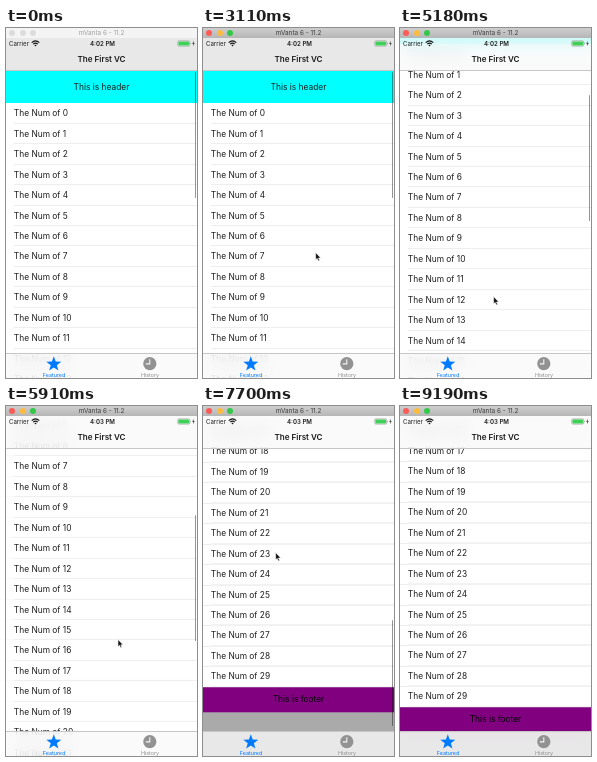
An HTML page for the animation above (9940 ms loop, 191 by 350 pixels).

```html
<!DOCTYPE html>
<html lang="en">
<head>
<meta charset="utf-8">
<title>Table with header and footer</title>
<style>
html, body { margin: 0; width: 100%; height: 100%; overflow: hidden; background: #fff; }
body { font: 8.4px Inter, Roboto, "Liberation Sans", sans-serif; color: #1c1c1c; }
#stage { position: relative; width: 191px; height: 350px; overflow: hidden; }
#stage div, #stage svg { position: absolute; }
.mid { left: 0; width: 191px; text-align: center; white-space: nowrap; }

#view { left: 0; top: 10px; width: 191px; height: 340px; background: #aaa; overflow: hidden; }
#list { left: 0; top: 32.6px; width: 191px; }
.row { left: 0; width: 191px; height: 20.45px; line-height: 20.45px; background: #fff; }
.row span { position: absolute; left: 7.8px; right: 0; height: 100%; box-sizing: border-box; border-bottom: 1px solid #eee; white-space: nowrap; }
.head { height: 32.7px; line-height: 32.7px; background: #0ff; }
.foot { height: 25.2px; line-height: 25.2px; background: #800080; color: #000; }

.glass { left: 0; width: 191px; box-sizing: border-box; background: rgba(249, 249, 249, .79); backdrop-filter: blur(7px); }
#nav { top: 10px; height: 33px; border-bottom: 1px solid #c6c6c6; }
#tabs { top: 325px; height: 25px; border-top: 1px solid #c6c6c6; }
#tabs div { top: 17.5px; width: 60px; font-size: 5.4px; line-height: 7px; text-align: center; }
.status { top: 2px; font-size: 6.1px; line-height: 7px; }
.title { top: 15px; font-size: 8.1px; line-height: 12px; font-weight: 600; }

#bar { left: 0; top: 0; width: 191px; height: 10px; background: #f4f4f4; color: #a0a0a0; font-size: 6.4px; line-height: 10px; }
#bar.on { background: linear-gradient(#cecece, #b6b6b6); color: #3c3c3c; }
#bar i { position: absolute; top: 2px; width: 6px; height: 6px; border-radius: 50%; background: #dcdcdc; }
#bar.on i:nth-of-type(1) { background: #fc5b57; }
#bar.on i:nth-of-type(2) { background: #fdbc40; }
#bar.on i:nth-of-type(3) { background: #34c84a; }

#thumb { left: 188.5px; width: 1.5px; border-radius: 1px; background: rgba(0, 0, 0, .42); }
#mouse { left: 0; top: 0; }
</style>
</head>
<body>
<div id="stage">
  <div id="view"><div id="list"></div></div>
  <div id="thumb"></div>
  <div id="nav" class="glass">
    <div class="status" style="left:3px">Carrier</div>
    <svg style="left:25px;top:2px" width="9" height="7" viewBox="0 0 9 7" fill="none" stroke="#111" stroke-width="1.1">
      <path d="M.7 2.6Q4.5 -.9 8.3 2.6M2.2 4.1Q4.5 2.1 6.8 4.1"/>
      <path d="M3.3 5.1Q4.5 4.2 5.7 5.1L4.5 6.4Z" fill="#111" stroke="none"/>
    </svg>
    <div class="status mid" id="clock" style="left:1px;font-weight:600"></div>
    <svg style="left:171px;top:2px" width="19" height="7" viewBox="0 0 19 7">
      <rect x=".7" y=".9" width="12" height="5.2" rx="1.2" fill="#fff" stroke="#777" stroke-width=".5"/>
      <rect x="1.4" y="1.6" width="10.6" height="3.8" rx=".6" fill="#3fd058"/>
      <path d="M13.3 2.5Q14.3 3.5 13.3 4.5Z" fill="#555"/>
      <path d="M16.8 .8L15.2 3.8H16.4L15.9 6.2L17.7 3H16.5Z" fill="#333"/>
    </svg>
    <div class="title mid">The First VC</div>
  </div>
  <div id="tabs" class="glass">
    <svg style="left:0;top:0" width="191" height="20">
      <path id="star" fill="#007aff"/>
      <circle cx="143.8" cy="9.7" r="6.6" fill="#929292"/>
      <path d="M143.8 5.2V9.9H139.8" fill="none" stroke="#f4f4f4" stroke-width="1.1"/>
    </svg>
    <div style="left:18px;color:#007aff">Featured</div>
    <div style="left:114px;color:#8e8e8e">History</div>
  </div>
  <div id="bar">
    <i style="left:3px"></i><i style="left:13.5px"></i><i style="left:24px"></i>
    <div class="mid">mVanta 6 - 11.2</div>
  </div>
  <svg id="mouse" width="8" height="11" viewBox="0 0 8 11">
    <path d="M.6 .6V7.8L2.2 6.4L3.3 9L4.6 8.4L3.5 6H5.8Z" fill="#111" stroke="#fff" stroke-width=".6"/>
  </svg>
</div>
<script>
const $ = id => document.getElementById(id);
const LOOP = 9940, WAKE = 1040, TICK = 147.8;
const ROW = 20.45, HEAD = 32.7, ROWS = 30, MAX = 387.7;

// each gesture eases the scroll offset and the pointer to a new place
const gestures = [
  { from: 0, to: 0, y: 0, mouse: [-20, 140] },
  { from: 900, to: 1340, y: 0, mouse: [92, 154] },
  { from: 1340, to: 2070, y: -40.5, mouse: [95, 235] },      // pull down
  { from: 2220, to: 3100, y: 0, mouse: [112, 224] },         // spring back
  { from: 3110, to: 3250, y: 0, mouse: [98, 226] },
  { from: 3990, to: 4290, y: 0, mouse: [96, 318] },
  { from: 4290, to: 5170, y: 59, mouse: [93, 268] },         // drag up
  { from: 5180, to: 5470, y: 68, mouse: [93, 259] },
  { from: 5620, to: 6500, y: MAX + 2, mouse: [152, 175] },   // flick to the end
  { from: 6510, to: 6650, y: MAX, mouse: [152, 175] },
  { from: 6660, to: 7400, y: MAX, mouse: [73, 178] },
  { from: 7400, to: 7690, y: MAX + 20, mouse: [72, 146] },   // pull past the footer
  { from: 8140, to: 8860, y: MAX, mouse: [150, 210] },       // spring back
  { from: 8860, to: 9160, y: MAX, mouse: [200, 250] }
];

function add(cls, top, html) {
  const el = document.createElement("div");
  el.className = cls;
  el.style.top = top + "px";
  el.innerHTML = html;
  $("list").append(el);
}
add("head mid", 0, "This is header");
for (let i = 0; i < ROWS; i++) add("row", HEAD + i * ROW, `<span>The Num of ${i}</span>`);
add("foot mid", HEAD + ROWS * ROW, "This is footer");

$("star").setAttribute("d", "M" + Array.from({ length: 10 }, (_, i) => {
  const r = i % 2 ? 3.2 : 7.9, a = i * Math.PI / 5;
  return (47.8 + r * Math.sin(a)).toFixed(2) + " " + (10.2 - r * Math.cos(a)).toFixed(2);
}).join("L") + "Z");

const easeOut = p => 1 - (1 - p) ** 2;
const mix = (a, b, p) => a + (b - a) * p;

function pose(t) {
  const i = Math.max(0, gestures.findLastIndex(g => g.from <= t));
  const g = gestures[i], last = gestures[Math.max(0, i - 1)];
  const p = t < g.to ? easeOut((t - g.from) / (g.to - g.from)) : 1;
  return { y: mix(last.y, g.y, p), mouse: g.mouse.map((v, j) => mix(last.mouse[j], v, p)) };
}

function draw(time) {
  // the screen refreshes in steps
  const t = Math.max(0, WAKE + Math.floor((time - WAKE) / TICK) * TICK);
  const { y, mouse } = pose(t);
  $("list").style.transform = `translateY(${-y}px)`;
  $("mouse").style.transform = `translate(${mouse[0]}px, ${mouse[1]}px)`;
  $("mouse").style.display = time < WAKE ? "none" : "block";
  $("bar").className = time < WAKE ? "" : "on";
  $("clock").textContent = t > 5700 ? "4:03 PM" : "4:02 PM";

  // the scroll thumb shrinks past either end and hides at rest
  const inside = Math.min(MAX, Math.max(0, y));
  const moving = y !== inside || y !== pose(t - 300).y;
  const thumb = $("thumb").style;
  thumb.top = 43.5 + inside / MAX * 152 + Math.max(0, y - MAX) * .9 + "px";
  thumb.height = 126 - Math.abs(y - inside) + "px";
  thumb.display = moving ? "block" : "none";
}

const start = performance.now();
function loop() {
  draw((performance.now() - start) % LOOP);
  requestAnimationFrame(loop);
}
loop();
</script>
</body>
</html>
```
